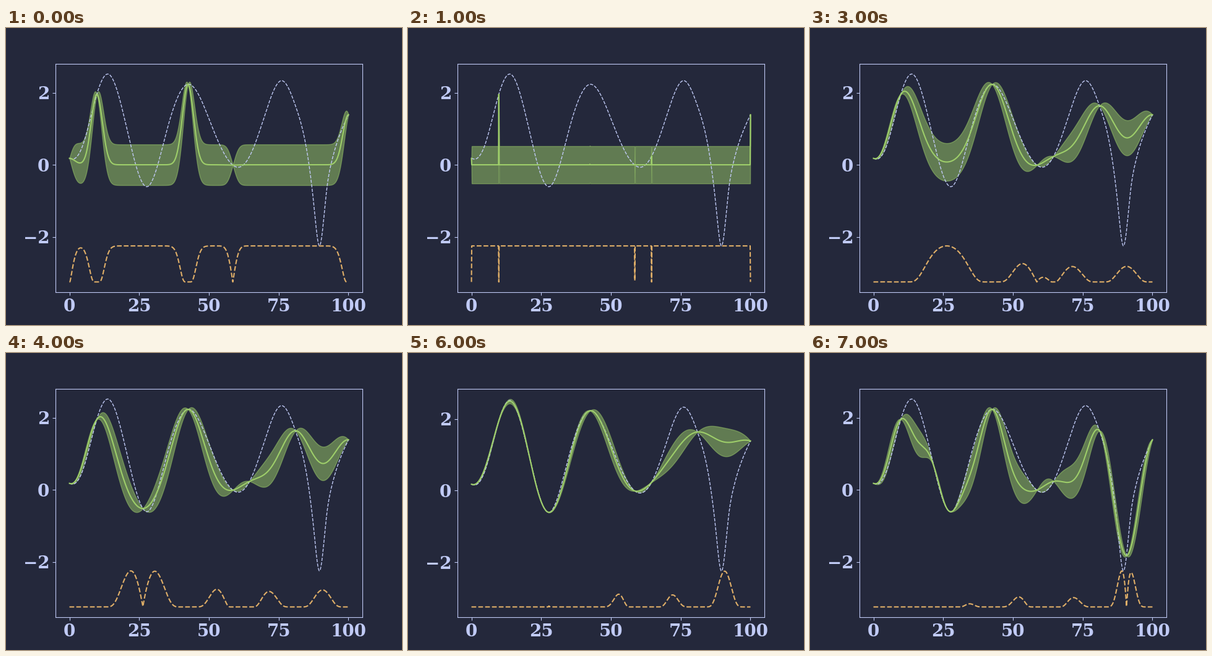
Animation, 640 px wide and 480 px high, one loop 8 s. Source, as a matplotlib script:

```python
"""Bayesian optimisation: a Gaussian process hunting for a function's minimum."""
import math

import matplotlib.pyplot as plt
import numpy as np
from matplotlib.animation import FuncAnimation

BG, FG, GREEN, ORANGE = "#24283b", "#c0caf5", "#9ece6a", "#e0af68"
BAND = 0.3853  # z-score of a 30 % confidence interval

plt.rcParams.update({
    "font.family": "DejaVu Serif", "font.weight": "bold", "font.size": 20,
    "axes.facecolor": BG, "axes.edgecolor": FG,
    "xtick.color": FG, "ytick.color": FG,
})

# Turning and inflection points of the hidden function.
KNOTS = [
    (0, .18), (1.2, .158), (4.8, .545), (9.8, 1.955), (14, 2.515), (21, .86),
    (27.9, -.607), (35, .98), (42.7, 2.235), (51, 1.08), (60.4, -.068),
    (64.6, .24), (70.5, 1.49), (76.1, 2.335), (81, 1.64), (84.6, .6),
    (87.7, -1.19), (89.55, -2.25), (92.1, -.76), (93.9, .064), (100, 1.39),
]

# Five starting samples, then one new sample per step.
SAMPLES = np.array([0, 9.81, 42.49, 58.558, 100,
                    64.565, .1, 81, 26.3, 21.6, 27.9, 90.7])
START = 5
LENGTHS = [2, .015, 5.9, 5.7, 5.65, 7.6, 7.85, 4.4]  # kernel fitted per step


def spline(knots):
    """Natural cubic spline through the knots."""
    x, y = np.transpose(knots)
    n, h = len(x), np.diff(x)
    slope = np.diff(y) / h
    a, b = np.eye(n), np.zeros(n)
    for i in range(1, n - 1):
        a[i, i - 1:i + 2] = h[i - 1], 2 * (h[i - 1] + h[i]), h[i]
        b[i] = 6 * (slope[i] - slope[i - 1])
    m = np.linalg.solve(a, b)

    def evaluate(t):
        i = np.clip(np.searchsorted(x, t) - 1, 0, n - 2)
        d = t - x[i]
        c1 = slope[i] - h[i] * (2 * m[i] + m[i + 1]) / 6
        return y[i] + d * (c1 + d * (m[i] / 2 + d * (m[i + 1] - m[i]) / (6 * h[i])))

    return evaluate


def kernel(a, b, length):
    return np.exp(-((a[:, None] - b) / length) ** 2 / 2)


def posterior(xs, ys, length):
    """Mean and deviation on the grid, with the most likely signal scale."""
    gram = kernel(xs, xs, length) + 1e-9 * np.eye(len(xs))
    cross = kernel(grid, xs, length)
    weights = np.linalg.solve(gram, ys)
    scale = ys @ weights / len(xs)
    var = 1 - np.sum(cross * np.linalg.solve(gram, cross.T).T, axis=1)
    return cross @ weights, np.sqrt(scale * np.clip(var, 1e-12, None))


def expected_improvement(mean, std, best):
    z = (best - mean) / std
    cdf = (1 + np.vectorize(math.erf)(z / math.sqrt(2))) / 2
    pdf = np.exp(-z ** 2 / 2) / math.sqrt(2 * math.pi)
    return std * (z * cdf + pdf)


target = spline(KNOTS)
grid = np.linspace(0, 100, 1000)
truth = target(grid)

fig, ax = plt.subplots(figsize=(6.4, 4.8), dpi=100, facecolor=BG)


def draw(step):
    xs = SAMPLES[:START + step]
    ys = target(xs)
    mean, std = posterior(xs, ys, LENGTHS[step])
    gain = expected_improvement(mean, std, ys.min())
    gain = (gain - gain.min()) / (gain.max() - gain.min())

    ax.clear()
    ax.plot(grid, truth, "--", color=FG, lw=1)
    ax.plot(grid, mean, color=GREEN)
    ax.fill_between(grid, mean - BAND * std, mean + BAND * std,
                    color=GREEN, alpha=.5)
    ax.plot(grid, gain + truth.min() - 1, "--", color=ORANGE)
    ax.set_xticks(range(0, 101, 25))
    ax.set_yticks([-2, 0, 2])


anim = FuncAnimation(fig, draw, frames=len(LENGTHS), init_func=lambda: None,
                     interval=1000, repeat=True)
plt.show()
```
